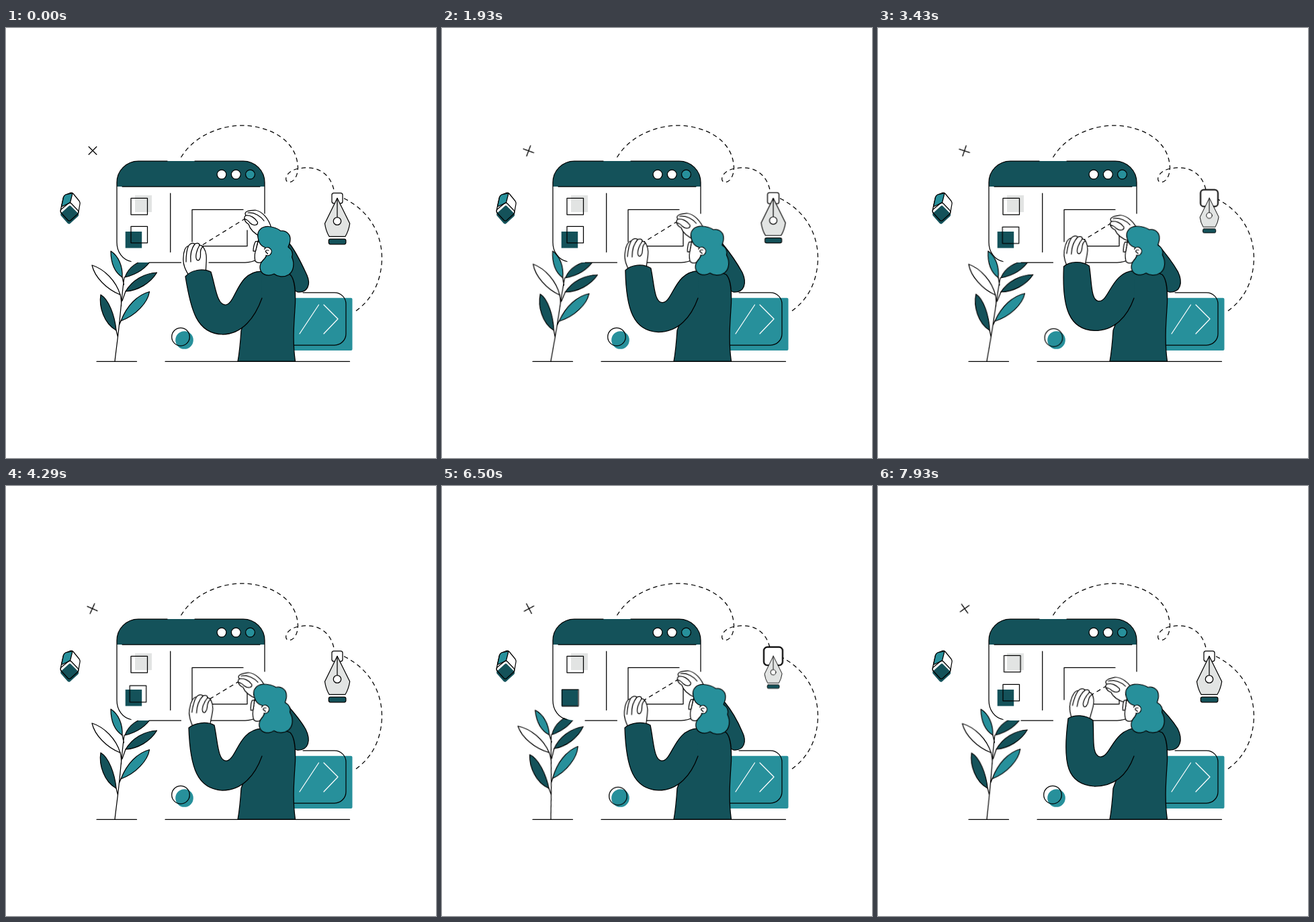
Write an HTML page without scripts that moves like this. It is 640 px wide and 640 px high and loops after 8000 ms.

```html
<!DOCTYPE html>
<html lang="en">
<head>
<meta charset="utf-8">
<title>Designer at work</title>
<style>
  html, body { margin: 0; width: 100%; height: 100%; overflow: hidden; background: #fff; }
  svg { display: block; width: 100%; height: 100%; }
  svg * { stroke-linecap: round; stroke-linejoin: round; }
  .line { fill: none; stroke: #000; stroke-width: 1.25; }
  .white { fill: #fff; }
  .dark { fill: #14525a; }
  .teal { fill: #27909b; }
  .gray { fill: #e2e4e3; }
  .dash { stroke-dasharray: 6.5 5; stroke-linecap: butt; }
  .code { fill: none; stroke: #fff; stroke-width: 1.25; }
  .move { animation: 8s ease-in-out infinite; }

  .cross { animation-name: cross; animation-timing-function: linear; transform-origin: 129px 182.5px; }
  @keyframes cross {
    0% { transform: rotate(0) }
    16.125% { transform: rotate(-17deg) }
    32.125% { transform: translate(-.3px, .7px) rotate(-32deg) }
    53.625% { transform: translate(-.5px, 0) rotate(-21deg) }
    66.125% { transform: rotate(-50deg) }
    81.25% { transform: translate(.5px, 0) rotate(-73deg) }
    99.125%, 100% { transform: rotate(-80deg) }
  }

  .plant { animation-name: sway; transform-origin: 162px 496px; }
  @keyframes sway {
    0% { transform: rotate(0); animation-timing-function: ease-in }
    16.125% { transform: rotate(1.4deg); animation-timing-function: ease-out }
    33% { transform: rotate(3.9deg); animation-timing-function: ease-in }
    53.625% { transform: rotate(0); animation-timing-function: linear }
    66.125% { transform: rotate(-5.6deg); animation-timing-function: ease-out }
    73.75% { transform: rotate(-6.8deg); animation-timing-function: ease-in }
    81.25% { transform: rotate(-6.1deg); animation-timing-function: linear }
    99.125% { transform: rotate(-1deg) }
    100% { transform: rotate(-.9deg) }
  }

  .box1 { animation-name: box1; }
  @keyframes box1 {
    0%, 28.5%, 40%, 62%, 73%, 97% { transform: none }
    32.125% { transform: translate(3px, -2px); animation-timing-function: ease-out }
    35%, 65%, 67.5% { transform: translate(6px, -4px) }
    99.125% { transform: translate(1.5px, -1px) }
    100% { transform: translate(2.5px, -1.7px) }
  }
  .box2 { animation-name: box2; }
  @keyframes box2 {
    0%, 10%, 24%, 42%, 55.8%, 75%, 89%, 100% { transform: none }
    14%, 18%, 46%, 49.4%, 79%, 83% { transform: translate(-7.5px, 7.5px) }
  }
  .ring { animation-name: ring; }
  @keyframes ring {
    0%, 29%, 46%, 76%, 95%, 100% { transform: none }
    32.125% { transform: translate(1px, .8px) }
    37.5%, 87% { transform: translate(5px, 4.2px) }
    81.25% { transform: translate(2px, 1.8px) }
  }

  .knob, .nib { transform-origin: 493px 253.3px; }
  .knob { animation-name: knob; }
  @keyframes knob {
    0%, 18.7%, 52.5%, 66.5%, 97%, 100% { transform: none; animation-timing-function: ease-in }
    32.125% { transform: scale(1.31); animation-timing-function: ease-out }
    39%, 81.25% { transform: scale(1.75) }
    75% { transform: scale(1.5); animation-timing-function: ease-out }
  }
  .nib { animation-name: nib; }
  @keyframes nib {
    0%, 18.7%, 52.5%, 66.5%, 97%, 100% { transform: none; animation-timing-function: ease-in }
    32.125% { transform: scale(.88); animation-timing-function: ease-out }
    39%, 81.25% { transform: scale(.7) }
    75% { transform: scale(.8); animation-timing-function: ease-out }
  }

  .arm { animation-name: arm; }
  @keyframes arm {
    0%, 32%, 66% { d: path("M381 402C371 430 352 456 322 456C284 455 275 420 267 370C275 360 293 357 305 363C312 385 314 413 327 412C342 411 344 362 380 362") }
    16.125%, 48% { d: path("M381 402C371 430 352 449 322 449C286 447 273 418 279 351C288 344 306 343 317 352C320 374 317 406 330 405C345 405 349 362 383 361") }
    53.625%, 81.25% { d: path("M381 402C371 430 352 453 322 453C285 451 274 420 272 360C281 352 299 350 310 356C315 378 315 410 328 409C343 408 346 362 381 361"); animation-timing-function: ease-out }
    99.125%, 100% { d: path("M381 402C371 430 352 447 322 447C282 444 274 415 283 346C292 340 309 340 320 349C322 370 317 402 331 403C346 404 350 362 385 360") }
  }
  .left { animation-name: left; transform-origin: 285px 366px; }
  @keyframes left {
    0%, 32%, 66% { transform: translate(0, 0) rotate(0) }
    16.125%, 48% { transform: translate(13px, -13px) rotate(10deg) }
    53.625% { transform: translate(6px, -9px) rotate(8deg); animation-timing-function: ease-out }
    81.25% { transform: translate(6px, -7px) rotate(4deg); animation-timing-function: ease-out }
    99.125%, 100% { transform: translate(17px, -18px) rotate(13deg) }
  }
  .right { animation-name: right; transform-origin: 395px 297px; }
  @keyframes right {
    0%, 32%, 66% { transform: translate(0, 0) rotate(0) }
    16.125%, 48% { transform: translate(-10px, 6px) rotate(-8deg) }
    53.625% { transform: translate(-8px, 4px) rotate(-6deg); animation-timing-function: ease-out }
    81.25% { transform: translate(-4px, 3px) rotate(-2deg); animation-timing-function: ease-out }
    99.125%, 100% { transform: translate(-14px, 9px) rotate(-10deg) }
  }
  .span { animation-name: span; }
  @keyframes span {
    0%, 32%, 66% { d: path("M357 283L289 325") }
    16.125%, 48% { d: path("M345 292L306 316") }
    53.625% { d: path("M348 290L300 319"); animation-timing-function: ease-out }
    81.25% { d: path("M353 287L297 321"); animation-timing-function: ease-out }
    99.125%, 100% { d: path("M341 297L314 313") }
  }
  .elbow { animation-name: elbow; }
  @keyframes elbow {
    0%, 66% { d: path("M385 305L422 321C432 333 441 353 448 368C454 382 449 394 434 393L400 375Z") }
    32% { d: path("M383 307L419 319C429 332 440 351 448 366C454 381 450 394 434 393L400 375Z") }
    16.125%, 48%, 53.625% { d: path("M375 312L415 322C425 333 438 348 446 362C454 378 451 394 433 393L400 375Z") }
    81.25% { d: path("M383 307L421 322C431 334 441 352 447 366C454 380 450 394 434 393L400 375Z"); animation-timing-function: ease-out }
    99.125%, 100% { d: path("M367 316L414 323C424 333 437 347 446 361C454 377 451 394 432 393L400 375Z") }
  }
  .head { animation-name: head; transform-origin: 402px 368px; }
  @keyframes head {
    0% { transform: translate(0, 0) rotate(0) }
    16.125% { transform: translate(0, -2px) rotate(-5.5deg) }
    32.125% { transform: translate(0, -1px) rotate(-3deg) }
    53.625% { transform: translate(0, -2px) rotate(-6deg) }
    66.125% { transform: translate(.3px, .3px) rotate(1.3deg) }
    81.25% { transform: translate(0, -.4px) rotate(-1.2deg); animation-timing-function: ease-out }
    99.125%, 100% { transform: translate(0, -2px) rotate(-6deg) }
  }
</style>
</head>
<body>
<svg viewBox="0 0 640 640">
  <!-- dashed trail -->
  <path class="line dash" d="M260.500 192.500C280 160 320 145 351 145C395 146 433 168 434.500 208C434 222 428 230 420 229.500C413 227 417 214 432 210C460 203 482 214 488 241"/>
  <path class="line dash" d="M503 253.500C540 272 560 305 559.500 345C558 378 545 405 518 423"/>

  <path class="line move cross" d="M123.200 176.700L134.800 188.300M134.800 176.700L123.200 188.300"/>

  <!-- cube -->
  <path class="line white" d="M89 248L96 245.300Q98.500 244.500 100 246.500L109 257.500Q110.500 259.500 110 262L107.500 276L94 288L82 275Q81 273.500 81.300 271L85.500 252Q86.500 249 89 248Z"/>
  <path class="line teal" d="M89 248L99 246L95.500 260L82.500 266L85.500 252Q86.500 249 89 248Z"/>
  <path class="dark" d="M93.500 265Q95 263.500 96.500 265L107.500 276Q109 278 107.500 280L95.500 291Q93.500 292.500 91.500 290.500L81.500 279Q80.500 277 82 275.500Z"/>
  <path class="line" d="M82 270L93 261Q95 259.500 97 261L107 271.500Q108.500 274 107 276.500L96 286.500Q94 288 92 286L82 275Q80.500 273 82 270Z"/>

  <!-- plant -->
  <g class="move plant">
    <path class="line" d="M162 496C164 478 166 465 168 446C171 418 173 392 176 371M164 450L166.500 460M171 436L168.500 442M170 397Q172 404 171.500 414M178 392L173 406M173 371L175.500 382"/>
    <path class="line dark" d="M164 450C146 440 138 415 141 397C153 404 162 428 164 450Z"/>
    <path class="line teal" d="M171 436C180 413 196 397 213.500 392.500C211 409 193 428 171 436Z"/>
    <path class="line white" d="M170 397C150 389 132 371 128 353C147 359 164 377 170 397Z"/>
    <path class="line dark" d="M178 392C188 375 206 365 224.500 364C215 380 196 391 178 392Z"/>
    <path class="line teal" d="M173 371C161 363 156 348 156 332C167 339 174 354 173 371Z"/>
    <path class="line dark" d="M177 371C182 356 197 346 218 342C209 358 194 367 177 371Z"/>
  </g>

  <!-- browser window -->
  <rect class="white" x="165" y="198" width="220" height="151" rx="32"/>
  <path class="dark" d="M165 236V230A32 32 0 0 1 197 198H353A32 32 0 0 1 385 230V236Z"/>
  <path class="line" d="M240 198H197A32 32 0 0 0 165 230V319C165 334 174 345 186 347.500M281 198H353A32 32 0 0 1 385 230V276M173 236H378M213 349H260.500M302 349H356Q366 349 374 344"/>
  <circle class="line white" cx="321" cy="218" r="6.900"/>
  <circle class="line white" cx="342.300" cy="218" r="6.900"/>
  <circle class="line teal" cx="363.500" cy="218" r="6.900"/>
  <path class="line" d="M244.700 246V333.500M353 270.300H277V318M291 324.700H359V301"/>
  <rect class="gray" x="192" y="249" width="25" height="25"/>
  <rect class="line move box1" x="186" y="253.300" width="24.500" height="24.500"/>
  <rect class="dark" x="177.700" y="303" width="24.500" height="24.500"/>
  <rect class="line move box2" x="186" y="295.300" width="24.500" height="24.500"/>

  <circle class="teal" cx="265.500" cy="464.500" r="13.300"/>
  <circle class="line move ring" cx="260" cy="459.700" r="13.300"/>

  <!-- code panel -->
  <rect class="teal" x="420" y="401.800" width="95.500" height="78.200" rx="2"/>
  <path class="line" d="M442 393.800H489A17 17 0 0 1 506 411V455A17 17 0 0 1 489 472H428"/>
  <path class="code" d="M465.500 412L437 455M473 412L494 433L473 455"/>

  <!-- pen tool -->
  <rect class="line white move knob" x="485" y="245.500" width="16" height="15.500" rx="3"/>
  <g class="move nib">
    <path class="line gray" d="M493 253.300L474.500 291Q476 302 481 310.300H505Q510 302 511.700 291Z"/>
    <path class="line" d="M493 253.300V282"/>
    <circle class="line white" cx="493" cy="287.500" r="5.700"/>
    <rect class="line dark" x="480.300" y="314" width="25.600" height="7.800" rx="2.500"/>
  </g>

  <path class="line" d="M135 496.300H194.500M237 496.300H511.500"/>

  <!-- woman -->
  <path class="line dash move span" d="M357 283L289 325"/>
  <path class="line dark move elbow" d="M385 305L422 321C432 333 441 353 448 368C454 382 449 394 434 393L400 375Z"/>
  <g class="move right">
    <path class="line white" d="M380 311C369 306 363 299 361 292C354 288 353.500 281 357 279C353 273 362 271 371 271C381 273 391 283 395 298"/>
    <path class="line" d="M357 279C364 278 371 283 374.500 289C375 294 368 295 363 290C361 287 358 285 355 284M360 275C370 273.500 380 281 384 287"/>
  </g>
  <path class="line dark" d="M345 496C348 480 349 465 350 450L372 390L380 362Q404 358 423 367C430 374 431 390 430.500 410C429 435 426 465 430.500 496Z"/>
  <g class="move left">
    <path class="line white" d="M273 370C267 360 263 352 264 342C264 333 267 325 271.500 324.500C274 320.500 278 319 281 321.500C284 319.500 288 320 288 323.500C293 323 297 330 298 338C299 347 297 354 297.500 366"/>
    <path class="line" d="M268 348C268 338 269 330 271.500 324.500M275 348C274 338 276 328 281 321.500M288 323.500C284 330 281 340 284 345C287 348 290 343 289.500 337C289 331 291 327 293 325.500"/>
  </g>
  <path class="line dark move arm" d="M381 402C371 430 352 456 322 456C284 455 275 420 267 370C275 360 293 357 305 363C312 385 314 413 327 412C342 411 344 362 380 362"/>
  <g class="move head">
    <path class="line white" d="M376 314L371 333C370 338 370 343 371 347C375 351 381 350 386 344L397 325Z"/>
    <path class="line white" d="M371.500 317.500H375L371.500 332H368Q368 324 371.500 317.500Z"/>
    <path class="line teal" d="M375 312C373 302 380 295 391 295.500C399 296 405 299 409 302C418 301 424 308 423 316C423 320 421 323 420 326C427 331 427 337 425.500 341C430 351 428 362 421 367C413 372 404 370 399 366C391 370 382 368 379 361C376 353 380 348 385 343Q391 336 386 327C380 325 376 320 375 312Z"/>
    <path class="line white" d="M384.500 329A6 6 0 1 1 387 338.300"/>
    <path class="line" d="M391 331Q386 330 386.500 333L389.500 336"/>
  </g>
</svg>
</body>
</html>
```
